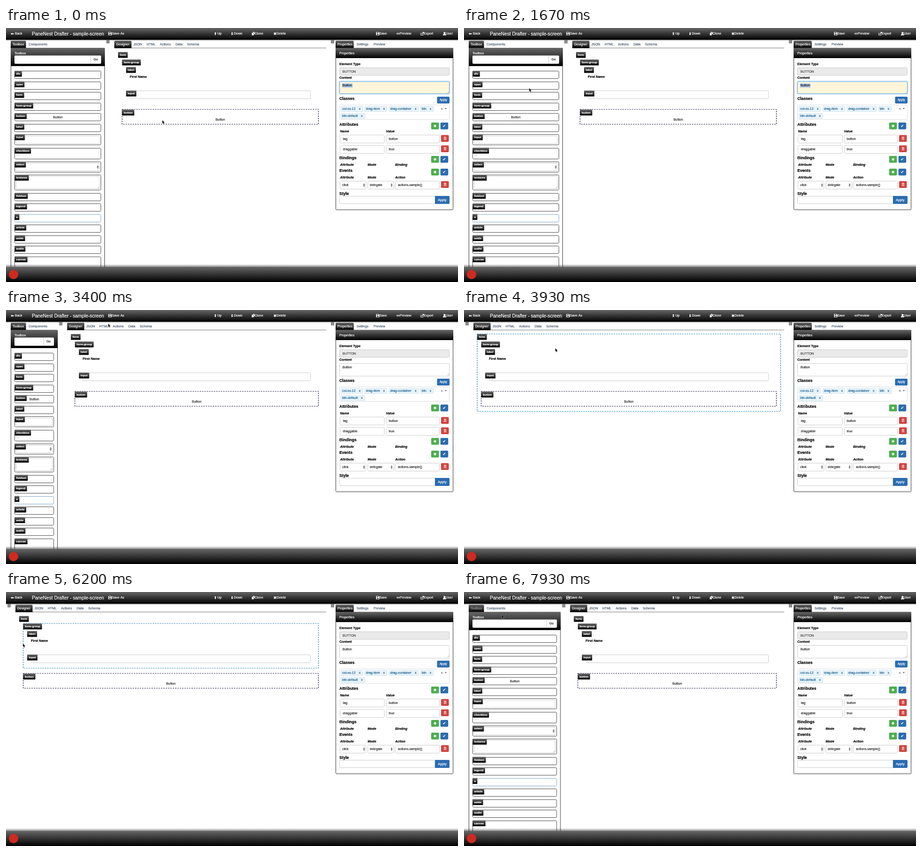
Animation, 960 px wide and 540 px high, one loop 8 s. Source, as an HTML page with a canvas:

```html
<!DOCTYPE html>
<html lang="en">
<head>
<meta charset="utf-8">
<title>Screen designer</title>
<style>
html, body { margin: 0; width: 100%; height: 100%; overflow: hidden; background: #fff; }
canvas { display: block; }
</style>
</head>
<body>
<canvas id="stage" width="960" height="540"></canvas>
<script>
const g = document.getElementById('stage').getContext('2d');
const LOOP = 8000, OPEN = 210;
const SANS = '"Liberation Sans", Arial, sans-serif', SYMBOLS = '"DejaVu Sans", sans-serif';
const BLUE = '#2b6cb0', GREEN = '#4cae4c', RED = '#d2433f', LINK = '#44566c', INK = '#222', CHIP = '#175d8e';

// Pointer path: time, x, y
const PATH = [
  [0, 332, 196], [540, 332, 196], [800, 185, 198], [1200, 90, 184], [1340, 90, 184],
  [2200, 216, 38], [2470, 217, 29], [3560, 217, 29], [3860, 203, 60], [3930, 194, 81],
  [4070, 185, 120], [4400, 152, 261], [5590, 152, 261], [6200, 36, 110], [6400, 20, 63],
  [6470, 20, 57], [6740, 20, 57], [7130, 6, 29], [7600, 6, 29], [7930, 80, 49], [8000, 88, 50]
];

function pointerAt(t) {
  const i = Math.max(1, PATH.findIndex(k => k[0] >= t));
  const [t0, x0, y0] = PATH[i - 1], [t1, x1, y1] = PATH[i];
  const p = Math.max(0, (t - t0) / (t1 - t0));
  return [x0 + (x1 - x0) * p, y0 + (y1 - y0) * p];
}

// The CSS "ease" curve
function ease(p) {
  if (p <= 0 || p >= 1) return p <= 0 ? 0 : 1;
  let lo = 0, hi = 1, u;
  for (let i = 0; i < 20; i++) {
    u = (lo + hi) / 2;
    if (.75 * u * (1 - u) + u ** 3 < p) lo = u; else hi = u;
  }
  return .3 * u * (1 - u) ** 2 + 3 * (1 - u) * u * u + u ** 3;
}

const sidebarEdge = t => OPEN * (1 - ease((t - 3260) / 500) + ease((t - 7527) / 500));

// A hairline stroke gives the slightly heavy weight of smoothed screen text
function text(str, x, y, { size = 7, color = INK, style = '', align = 'left', family = SANS } = {}) {
  g.font = `${style} ${size}px ${family}`;
  g.fillStyle = g.strokeStyle = color;
  g.textAlign = align;
  g.lineWidth = .2;
  g.fillText(str, x, y + size * .35);
  g.strokeText(str, x, y + size * .35);
}

function box(x0, y0, x1, y1, fill, stroke, radius = 2, line = 1) {
  if (x1 <= x0) return;
  g.beginPath();
  g.roundRect(x0, y0, x1 - x0, y1 - y0, radius);
  if (fill) { g.fillStyle = fill; g.fill(); }
  if (stroke) { g.strokeStyle = stroke; g.lineWidth = line; g.stroke(); }
}

function shade(y0, y1, top = '#666', bottom = '#000') {
  const fill = g.createLinearGradient(0, y0, 0, y1);
  fill.addColorStop(0, top);
  fill.addColorStop(1, bottom);
  return fill;
}

const dark = (x0, y0, x1, y1, radius = 0) => box(x0, y0, x1, y1, shade(y0, y1), null, radius);
const field = (x0, y0, x1, y1, fill = '#fff') => box(x0 + .5, y0 + .5, x1 - .5, y1 - .5, fill, '#ccc', 2);

function dashed(x0, y0, x1, y1, color) {
  g.setLineDash([3, 2]);
  box(x0, y0, x1, y1, null, color, 0, 1.2);
  g.setLineDash([]);
}

function shape(d, x, y, fill = '#fff', stroke, line = 1) {
  const path = new Path2D(d);
  g.save();
  g.translate(x, y);
  if (stroke) { g.strokeStyle = stroke; g.lineWidth = line; g.lineJoin = 'round'; g.stroke(path); }
  g.fillStyle = fill;
  g.fill(path, 'evenodd');
  g.restore();
}

function tag(name, x, y) {
  g.font = `bold 6.1px ${SANS}`;
  dark(x, y - 6, x + g.measureText(name).width + 7, y + 6.5, 1);
  text(name, x + 3.5, y, { size: 6.1, style: 'bold', color: '#fff' });
}

function activeTab(name, x0, x1, color = '#fff') {
  box(x0, 27, x1, 43, shade(27, 43), null, [2, 2, 0, 0]);
  text(name, x0 + 4, 35, { color });
}

function menuIcon(x, color = '#333') {
  g.fillStyle = color;
  for (let i = 0; i < 4; i++) g.fillRect(x, 26 + i * 1.8, 7, 1);
}

function stepper(x, y) {
  shape('M-2 -.8L0 -3.2L2 -.8ZM-2 .8L0 3.2L2 .8Z', x, y, '#333');
}

function grip(x, y) {
  shape('M0 -4L-4 0M0 -1.8L-1.8 0', x, y, 'transparent', '#999', .6);
}

const ICONS = {
  disk: 'M0 0H5.5L7 1.5V7H0ZM1.5 .8V2.8H4.8V.8ZM1.5 4.2V6.3H5.5V4.2Z',
  copy: 'M0 2H4V7H0ZM2 0H6V5H4.6V1.4H2Z',
  eye: 'M0 3.5Q3.5 -.6 7 3.5Q3.5 7.6 0 3.5ZM3.5 1.9A1.6 1.6 0 1 0 3.6 1.9ZM3.5 2.8A.7 .7 0 1 1 3.4 2.8Z',
  export: 'M0 2H2V3H1V6H5V5H6V7H0ZM3.5 0H7V3.5L5.8 2.3L3.6 4.6L2.4 3.4L4.7 1.2Z',
  user: 'M3.3 0A1.7 2 0 0 1 4.3 3.8L6.7 5.4V7H0V5.4L2.3 3.8A1.7 2 0 0 1 3.3 0Z',
  trash: 'M0 1H1.8V0H4.2V1H6V2H0ZM.6 2.6H5.4V7H.6ZM1.6 3.4V6.2H2.2V3.4ZM2.8 3.4V6.2H3.3V3.4ZM3.9 3.4V6.2H4.5V3.4Z'
};

function topBar() {
  dark(0, 0, 960, 25);
  g.fillStyle = shade(25, 28, 'rgba(0,0,0,.35)', 'rgba(0,0,0,0)');
  g.fillRect(0, 25, 960, 3);
  const white = { color: '#fff' }, symbol = { color: '#fff', size: 8, family: SYMBOLS };
  text('PaneNest Drafter - sample-screen', 55, 12, { color: '#fff', size: 10.1 });
  for (const [label, x] of [['Back', 19], ['Save As', 225], ['Up', 449], ['Down', 484], ['Clone', 528],
    ['Delete', 574.5], ['Save', 793], ['Preview', 836], ['Export', 887], ['User', 934]]) text(label, x, 12, white);
  text('⬅', 10, 12, symbol);
  text('⬆', 441.5, 12, symbol);
  text('⬇', 477, 12, symbol);
  text('✖', 568, 12, symbol);
  for (const [name, x] of [['disk', 217.5], ['copy', 522], ['disk', 786], ['eye', 829], ['export', 880.5], ['user', 928]])
    shape(ICONS[name], x, 8.5);
}

const TOOLS = ['div', 'span', 'form', 'form-group', 'button', 'label', 'input', 'checkbox', 'select',
  'textarea', 'fieldset', 'legend', 'a', 'article', 'aside', 'audio', 'canvas'];
const HEIGHTS = { input: 23, checkbox: 24, select: 22.5, textarea: 33, canvas: 30 };

function toolbox(edge, t) {
  if (edge < 12) return;
  g.save();
  g.beginPath();
  g.rect(0, 25, edge + .5, 515);
  g.clip();
  const right = edge - 8;
  activeTab('Toolbox', 10, 42.5, t > 7527 ? '#999' : '#fff');
  text('Components', 48, 35, { color: LINK });
  box(10.5, 43, edge - .5, 520, '#fff', '#333');
  dark(10, 42.5, edge, 81);
  text('Toolbox', 18, 53.5, { color: '#fff' });
  box(18, 58.5, right, 76, '#fff', null, 2);
  g.fillStyle = '#ccc';
  g.fillRect(right - 22.5, 58.5, 1, 17.5);
  text('Go', right - 11.5, 67, { align: 'center' });

  let next = 91;
  for (const name of TOOLS) {
    const h = HEIGHTS[name] || 17, y = Math.round(next), bottom = Math.round(next + h);
    box(18.5, y + .5, right - .5, bottom - .5, '#fff', name === 'a' ? '#7fa9c9' : '#4c4c4c', 2);
    if (['input', 'select', 'textarea'].includes(name))
      box(21.5, y + 3.5, right - 3.5, bottom - 3.5, '#fff', '#ccc', 1);
    if (name === 'button') text('Button', (18 + right) / 2, y + 9, { align: 'center' });
    if (name === 'checkbox') box(22.5, y + 10.5, 28, y + 16, '#fff', '#bbb', 1, .8);
    if (name === 'select') stepper(right - 7, y + 11.5);
    if (name === 'textarea') grip(right - 4, bottom - 4);
    tag(name, 18, next + 6);
    next += h + 5.5;
  }
  g.restore();
}

function hoveredPart(edge, [x, y]) {
  const inside = (x0, y0, x1, y1) => x >= edge + x0 && x <= x1 && y >= y0 && y <= y1;
  if (inside(36, 173, 664, 205)) return 'button';
  if (inside(36, 67, 664, 162)) return 'group';
  return inside(28, 51, 672, 215) ? 'form' : '';
}

function designer(edge, hovered) {
  g.fillStyle = '#777';
  g.fillRect(edge + 20, 42, 660 - edge, 1);
  activeTab('Designer', edge + 20, edge + 56.5);
  for (const [label, x] of [['JSON', 60.5], ['HTML', 88.5], ['Actions', 117], ['Data', 150], ['Schema', 174.5]])
    text(label, edge + x, 35, { color: LINK });
  if (hovered === 'form') dashed(edge + 28, 51, 672.5, 215.5, '#2380bd');
  if (hovered === 'group') dashed(edge + 36.5, 67, 663.5, 162, '#2380bd');
  field(edge + 53, 133, 647, 151);
  dashed(edge + 36.5, 173, 663.5, 204.5, '#20204e');
  text('Button', (edge + 700) / 2, 195, { align: 'center' });
  text('First Name', edge + 53, 103.5, { style: 'bold', color: '#000' });
  tag('form', edge + 28, 57);
  tag('form-group', edge + 36.5, 73);
  tag('label', edge + 45, 89);
  tag('input', edge + 45, 139);
  tag('button', edge + 36.5, 179.5);
}

function chip(name, x, y) {
  g.font = `7px ${SANS}`;
  const w = g.measureText(name).width;
  box(x + .5, y + .5, x + w + 18, y + 11.5, '#e9f4fb', '#c6dfef', 1, .8);
  text(name, x + 3, y + 6, { color: CHIP });
  text('x', x + w + 10, y + 6, { color: CHIP });
}

function iconButton(x, y, color, symbol) {
  box(x, y, x + 16.5, y + 14.5, color, null, 2);
  if (symbol === 'trash') shape(ICONS.trash, x + 5.5, y + 3.5, '#f6d0ce');
  if (symbol === 'plus') shape('M-1 -3H1V-1H3V1H1V3H-1V1H-3V-1H-1Z', x + 8.2, y + 7.2);
  if (symbol === 'check') text('✔', x + 8.2, y + 7, { size: 8, color: '#fff', align: 'center', family: SYMBOLS });
}

function properties(focused) {
  activeTab('Properties', 700, 738.5);
  text('Settings', 744.5, 35, { color: LINK });
  text('Preview', 780.5, 35, { color: LINK });
  box(700.5, 43, 949.5, 386.5, '#fff', '#333');
  dark(700, 42.5, 950, 64);
  text('Properties', 708, 54, { color: '#fff' });

  const bold = { style: 'bold', color: '#000' }, heading = { ...bold, size: 8.5 };
  const column = { style: 'italic bold', color: '#000' };
  text('Element Type', 708, 76.5, bold);
  field(708, 84, 942, 101, '#eaeaea');
  text('BUTTON', 714.5, 92.5, { color: '#444' });
  text('Content', 708, 106, bold);
  if (focused) {
    box(707.5, 113, 942.5, 140.5, null, '#c5e2f5', 3, 2);
    box(708.5, 114, 941.5, 139.5, '#fff5d9', '#66afe9');
    g.fillStyle = '#a5c3e4';
    g.fillRect(714, 118, 22, 8.5);
  } else field(708, 113, 942, 141);
  text('Button', 714.5, 122);
  grip(941, 139);

  text('Classes', 708, 150.5, heading);
  box(915.5, 146, 942, 160.5, BLUE);
  text('Apply', 928.8, 153, { size: 6.3, color: '#fff', align: 'center' });
  box(708.5, 163.5, 941.5, 194.5, '#fff', '#ddd');
  for (const [name, x] of [['col-xs-12', 711], ['drag-item', 761.5], ['drag-container', 813], ['btn', 880]])
    chip(name, x, 166);
  chip('btn-default', 711, 181);
  text('x', 924, 172, { color: '#666' });
  shape('M-2.2 -1.2H2.2L0 1.4Z', 934, 171.5, '#666');

  for (const [name, y] of [['Attributes', 205.5], ['Bindings', 276.5], ['Events', 303.5]]) {
    text(name, 708, y, heading);
    iconButton(903, y - 4.5, GREEN, 'plus');
    iconButton(922.7, y - 4.5, BLUE, 'check');
  }
  text('Name', 709.5, 220, column);
  text('Value', 807, 220, column);
  [['tag', 'button', 236], ['draggable', 'true', 258]].forEach(([name, value, y]) => {
    field(709, y - 9, 804, y + 9);
    field(807, y - 9, 921, y + 9);
    text(name, 715.5, y);
    text(value, 813, y);
    iconButton(924, y - 8.5, RED, 'trash');
  });
  for (const [last, y] of [['Binding', 291], ['Action', 318]])
    ['Attribute', 'Mode', last].forEach((name, i) => text(name, [709.5, 768, 826.5][i], y, column));
  field(709, 325, 765, 343);
  field(768, 325, 824, 343);
  field(826, 325, 921, 343);
  text('click', 714, 334);
  text('delegate', 772.5, 334);
  text('actions.sample()', 832.5, 334);
  stepper(760.5, 334);
  stepper(819, 334);
  iconButton(924, 325.5, RED, 'trash');
  text('Style', 708, 352.5, heading);
  field(708, 357, 912, 374);
  box(911, 357, 942, 374, BLUE, null, [0, 2, 2, 0]);
  text('Apply', 926.5, 365.5, { size: 7.3, color: '#fff', align: 'center' });
}

function footer() {
  g.fillStyle = shade(502, 508, 'rgba(0,0,0,0)', 'rgba(0,0,0,.45)');
  g.fillRect(0, 502, 960, 6);
  dark(0, 508, 960, 540);
  box(6, 514, 26, 534, '#cf2a20', null, 10);
}

function pointer([x, y], overMenu) {
  if (overMenu)
    shape('M0 0Q1.5 -.6 1.8 1V3.2L5.5 4Q6.6 4.6 5.8 6.6L5 8.6H.8L-1.8 5.4Q-1.8 4 0 5Z', x, y, '#fff', '#222', 1.4);
  else
    shape('M0 0V7L1.6 5.6L2.8 8.2L4.1 7.6L2.9 5.1H5Z', x, y, '#111', 'rgba(255,255,255,.7)', 1);
}

function draw(t) {
  const edge = sidebarEdge(t), at = pointerAt(t);
  const overMenu = Math.abs(at[0] - edge - 6.5) < 6 && at[1] < 34;
  g.fillStyle = '#fff';
  g.fillRect(0, 0, 960, 540);
  topBar();
  toolbox(edge, t);
  menuIcon(edge + 3, overMenu ? '#1d4a86' : '#333');
  menuIcon(690);
  designer(edge, hoveredPart(edge, pointerAt(Math.max(0, t - 70))));
  properties(t < 3270);
  footer();
  pointer(at, overMenu);
}

function frame() {
  draw(performance.now() % LOOP);
  requestAnimationFrame(frame);
}
frame();
</script>
</body>
</html>
```
